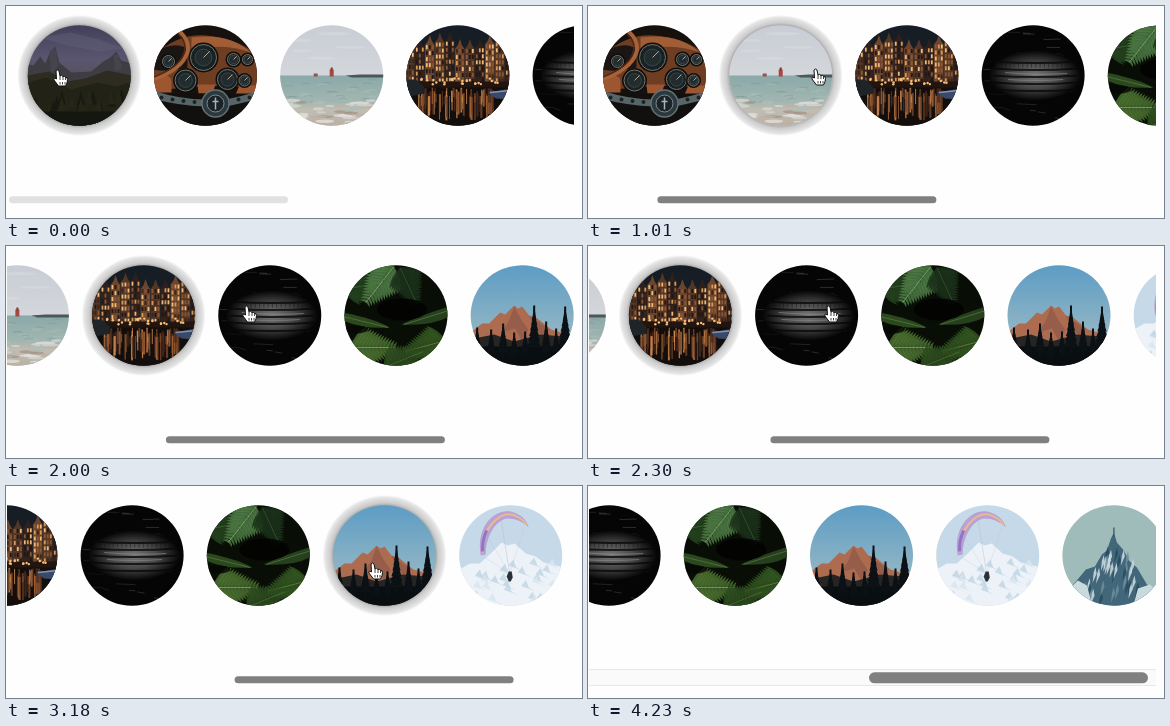
An HTML page for the animation above (4.46 s loop, 576 px wide and 212 px high).

```html
<!DOCTYPE html>
<html lang="en">
<head>
<meta charset="utf-8">
<title>Scrolling stories</title>
<style>
html, body { margin: 0; width: 100%; height: 100%; overflow: hidden; background: #fefefe; }
svg { display: block; width: 576px; height: 212px; }
</style>
</head>
<body>
<svg id="stage" viewBox="0 0 576 212"></svg>
<script>
const LOOP = 4460, GAP = 126.2, FIRST = 73.3, MID = 69.5;

let seed = 7;
const rnd = (a = 0, b = 1) => {
  seed = (seed * 16807) % 2147483647;
  return a + (b - a) * seed / 2147483647;
};
const pick = list => list[Math.floor(rnd(0, list.length))];
const repeat = (n, f) => Array.from({ length: n }, (_, i) => f(i)).join('');
const rect = (x, y, w, h, fill, o = 1) =>
  `<rect x="${x}" y="${y}" width="${w}" height="${h}" fill="${fill}" opacity="${o}"/>`;
const disc = (x, y, r, fill, stroke = 'none', w = 0) =>
  `<circle cx="${x}" cy="${y}" r="${r}" fill="${fill}" stroke="${stroke}" stroke-width="${w}"/>`;
const blob = (x, y, rx, ry, fill, o = 1) =>
  `<ellipse cx="${x}" cy="${y}" rx="${rx}" ry="${ry}" fill="${fill}" opacity="${o}"/>`;
const shape = (d, fill, o = 1) => `<path d="${d}" fill="${fill}" opacity="${o}"/>`;
const line = (d, stroke, w = 1, o = 1) =>
  `<path d="${d}" fill="none" stroke="${stroke}" stroke-width="${w}" opacity="${o}"/>`;
const back = fill => rect(-53, -52, 106, 104, fill);
const grad = (id, ...stops) => `<linearGradient id="${id}" x2="0" y2="1">` +
  stops.map(([at, c]) => `<stop offset="${at}" stop-color="${c}"/>`).join('') + '</linearGradient>';

function dusk() {
  return back('url(#dusk)') +
    shape('M-40-38L-8-43L20-36L45-27L20-24L-12-30Z', '#625f7a', .45) +
    shape('M-53-12L-46-10L-39-19L-34-12L-29-24L-24-29L-20-13L-8-3L12-4L24-14L31-18L37-24L42-15L53-12V30H-53Z', '#3e3d43') +
    shape('M-30-25L-24-27L-21-10L-28-2ZM34-20L38-22L43-8L36-4Z', '#4b4850', .7) +
    shape('M-53 0L-30-4L-12 6L6 3L28-5L53 0V52H-53Z', '#2e2b20') +
    shape('M-53 8L-34 2L-8 14L18 7L38 11L53 6V52H-53Z', '#222217') +
    repeat(34, () => {
      const x = rnd(-52, 52), y = rnd(12, 34);
      return shape(`M${x} ${y}l4 14h-8z`, pick(['#171a11', '#262516']));
    }) + rect(-53, 36, 106, 18, '#14170f');
}

function gauge(x, y, r) {
  return disc(x, y, r + 1, '#0d0f0f') + disc(x, y, r - 1, '#182123', '#77736a', 1) +
    disc(x, y, r * .6, '#222c2e', '#465153', .7) + line(`M${x} ${y}l${r * .45} ${-r * .45}`, '#b5a78c', 1);
}

function dashboard() {
  return back('#17110e') +
    shape('M-53-18Q-30-42 0-40T53-20V14Q10 6-53 16Z', '#6f3d22') +
    shape('M-14-38Q24-43 45-23Q24-32-14-27Z', '#a05d36') +
    shape('M-53-22Q-30-36-18-26V-8Q-36-3-53-6Z', '#1b1614') +
    shape('M-53 3Q-35-4-34 6V17H-53ZM-8 9H10L7 18H-7ZM34 10H53V19H30Z', '#9c5731') +
    gauge(-2, -18, 14) + gauge(-20, 5, 11.5) + gauge(22, 4, 11) +
    gauge(-37, -14, 7) + gauge(28, -16, 7) + gauge(42, -16, 6) + gauge(39, 5, 6.5) +
    line('M-32-48C-8-34-13-10-53 4', '#a86237', 4) + line('M-33-46C-12-33-17-11-53 2', '#4c281b', 1.5) +
    shape('M-53 18H53V52H-53Z', '#12100f') +
    shape('M-53 15Q-25 24 0 24H20Q38 21 53 15V23Q32 29 18 31H0Q-28 30-53 23Z', '#576569') +
    repeat(9, i => disc(-44 + i * 11, 22 + Math.sin(i / 8 * Math.PI) * 5, 2, '#1c2325')) +
    disc(10, 28, 13.5, '#2a393e', '#647277', 1.5) + disc(10, 28, 8.5, '#1a2326', '#7e8b8e', 1) +
    line('M10 22V34M7 26H13', '#aab3b3', 1.5) + line('M-40 38Q-28 48-18 47', '#4c352a', 2);
}

function sea() {
  return back('url(#haze)') +
    repeat(6, () => blob(rnd(-30, 35), rnd(-42, -14), rnd(8, 18), 1.5, '#d8dce0', .6)) +
    rect(-53, 0, 106, 53, 'url(#sea)') +
    shape('M14 0L28-1L53-1V2H20Z', '#4d5759') +
    rect(-2, -6, 4, 7, '#a9473e') + rect(-1, -8, 2, 3, '#7e3634') + rect(-18, -2, 4, 3, '#94534a') +
    repeat(30, () => line(`M${rnd(-50, 40)} ${rnd(4, 27)}q4-2 9 0`, pick(['#acc0bb', '#7f9a98']), 1, .6)) +
    repeat(46, () => blob(rnd(-46, 46), rnd(25, 49), rnd(4, 11), rnd(1, 2), pick(['#d8d6d1', '#c0b3a5', '#a4988a', '#b2bdb7', '#e2e0dc']), .8));
}

function canal() {
  const lights = ['#d99856', '#f0bb78', '#211714', '#8b5632', '#38251d'];
  const houses = repeat(11, i => {
    const x = -53 + i * 10, y = -37 + rnd(-5, 5);
    return shape(`M${x} 14V${y + 7}L${x + 3} ${y + 3}L${x + 5} ${y - 3}L${x + 7} ${y + 3}L${x + 9.6} ${y + 7}V14Z`,
      ['#533626', '#2e201c', '#6b452d'][i % 3]) +
      repeat(21, k => rect(x + 1 + k % 3 * 3, y + 7 + Math.floor(k / 3) * 6, 1.8, 4, pick(lights)));
  });
  return back('#171d24') + houses + rect(-53, 6, 106, 8, '#22150f') +
    repeat(26, () => disc(rnd(-48, 48), rnd(3, 9), 1.2, '#f6c07c')) +
    rect(-53, 12, 106, 42, '#130e0c') +
    repeat(75, () => rect(rnd(-40, 36), rnd(12, 22), rnd(.8, 2.4), rnd(8, 26), pick(['#d98f51', '#784729', '#4c2c1e', '#ad6839']), .8)) +
    shape('M-53 4L-42 4L-34 11V18L-53 22Z', '#1f2428') +
    shape('M30 17L53 13V24L38 23Z', '#39496a') + line('M32 17L53 15', '#8492b2', 1.5);
}

function ribs() {
  return back('#050505') +
    repeat(34, () => line(`M${rnd(-50, 30)} ${rnd(-46, 46)}l${rnd(4, 20)} ${rnd(-1, 2)}`, '#777', .6, rnd(.15, .6))) +
    blob(2, 0, 46, 25, 'url(#steel)') +
    repeat(5, i => line(`M-40 ${-14 + i * 7}Q2 ${-11 + i * 7} 45 ${-14 + i * 7}`, '#080808', 2, .8)) +
    repeat(18, i => line(`M${-36 + i * 4.3}-14v6`, '#151515', .8, .6)) +
    line('M-28-3Q4 0 34-2M-25 4Q4 6 30 4', '#8c8c8c', 1.2, .6);
}

// Narrow leaflets, shorter towards the tip.
function frond(x, y, len, turn, c, vein) {
  const n = 13;
  return `<g transform="translate(${x} ${y}) rotate(${turn})">` +
    repeat(n, i => {
      const p = i / n, l = len * (.46 - .36 * p), a = p * len;
      return [-1, 1].map(s =>
        shape(`M${a} 0Q${a + l * .25} ${s * l * .7} ${a + l * .8} ${s * l}Q${a + l * .6} ${s * l * .4} ${a + 3} 0Z`, c, .85)).join('');
    }) + line(`M0 0H${len}`, vein, .8) + '</g>';
}

function leaves() {
  return back('#080d06') +
    frond(-53, -26, 40, -10, '#24421e', '#42663a') +
    frond(-2, -49, 46, 128, '#4d7a43', '#83a876') + frond(4, -48, 40, 65, '#1c321a', '#375230') +
    shape('M53-9Q22 1 5 9Q36 11 53 1Z', '#263f1c') + line('M53-5L8 9', '#4a6b38') +
    shape('M-53-3Q-22 3-6 12Q-32 14-53 5Z', '#2b481e') + line('M-53 1L-8 12', '#4c6d38') +
    frond(-46, 32, 46, 0, '#4b7030', '#8aa75a') + frond(50, 25, 42, 165, '#335622', '#63833f') +
    frond(-12, 52, 42, -22, '#2d4d1f', '#4a6b31') +
    blob(6, -6, 25, 11, '#030402', .9) + blob(-40, 14, 12, 4, '#050704', .8);
}

function tree(x, y, w, h) {
  return repeat(6, i => {
    const half = w * (.3 + i * .14);
    return shape(`M${x} ${y + i * h / 9}l${half} ${h * .3}h${-2 * half}z`, '#0b1114');
  }) + rect(x - 1, y, 2, h, '#0b1114');
}

function ridge() {
  return back('url(#blue)') +
    shape('M-53 18L-40 8L-33 8L-22-3L-17-1L-8-10L-4-7L0-9L7 0L14 2L29 14L53 21V40H-53Z', '#ad6b50') +
    shape('M-8-9L-13 5L-21 17L-7 13L0 26L6 14L-1 4ZM7 0L12 13L20 20L27 14Z', '#7e5044', .5) +
    shape('M-53 24L-28 19L-8 26L18 19L53 22V52H-53Z', '#262523') +
    rect(-53, 31, 106, 22, '#090e10') +
    tree(12, -10, 7, 48) + tree(24, 6, 6, 35) + tree(43, -9, 8, 48) + tree(-19, 8, 6, 34) +
    tree(-31, 14, 5, 27) + tree(-45, 12, 6, 30) + tree(-8, 17, 5, 25) + tree(34, 13, 5, 28) + tree(3, 16, 5, 25);
}

function glider() {
  return back('#c5d9e9') +
    shape('M-53 15L-41 8L-31 8L-20-2L-9-13L-3-10L4-12L15-2L25 1L33 7L53 12V52H-53Z', '#ecf2f7') +
    repeat(30, () => shape(`M${rnd(-48, 44)} ${rnd(8, 45)}l5-6l3 8l6 3z`, pick(['#c2d6e5', '#d9e6ef']), .8)) +
    line('M-27 1L-1 18L-24-20M-1 18L-10-38L-1 18L14-28', '#b8b9cb', .4, .6) +
    shape('M-30 0C-35-28-17-47 0-44Q15-40 18-28Q9-37-3-37C-15-36-25-19-25-1Z', '#b9a1d3') +
    line('M-28-3C-29-27-12-43 1-41Q12-38 16-30', '#e6ba94', 2) +
    line('M-28-4Q-29-14-24-25', '#8e75c6', 3) +
    shape('M-2 16h3l1 6l-2 4h-2l-2-5z', '#29313b');
}

function peak() {
  return back('#9fbcbb') +
    shape('M-53 42L-38 26L-28 14L-19 11L-12-1L-7-5L-3-17L0-23L3-13L10-5L15 5L23 12L33 29L53 43V52H-53Z', '#42677a') +
    line('M0-28V-18', '#395766', 1.3) +
    repeat(44, () => {
      const y = rnd(-4, 46), x = rnd(-1, 1) * (y + 16) * .72;
      return shape(`M${x} ${y}l2-6l1 7l-4 9z`, pick(['#d0dde1', '#254b5f', '#6f8f9c']), .85);
    }) +
    shape('M-53 41L-36 25L-27 30L-21 52H-53ZM24 33L36 29L53 44V52H19Z', '#c9dadd');
}

const scenes = [dusk, dashboard, sea, canal, ribs, leaves, ridge, glider, peak];
const stage = document.getElementById('stage');
stage.innerHTML = `<defs>
  ${grad('dusk', [0, '#413f57'], [.35, '#5a5670'], [.6, '#564c51'])}
  ${grad('haze', [0, '#c8cdd5'], [.5, '#d3d6da'])}
  ${grad('sea', [0, '#8aa9a8'], [.5, '#a2b6b1'], [.65, '#c2bdb3'], [1, '#b9ada0'])}
  ${grad('blue', [0, '#5b9cc4'], [.7, '#94b6c4'])}
  <radialGradient id="steel"><stop offset="0" stop-color="#757575"/><stop offset=".5" stop-color="#484848"/>
    <stop offset="1" stop-color="#050505"/></radialGradient>
  <radialGradient id="glow"><stop offset=".8" stop-opacity=".42"/><stop offset=".87" stop-opacity=".2"/>
    <stop offset=".96" stop-opacity=".1"/><stop offset="1" stop-opacity="0"/></radialGradient>
  <clipPath id="round"><ellipse rx="51.5" ry="50.2"/></clipPath>
  <clipPath id="view"><rect x="1" width="567" height="212"/></clipPath></defs>
  <rect width="576" height="212" fill="#fefefe"/>
  <g clip-path="url(#view)"><g id="list">${scenes.map((draw, i) =>
    `<g transform="translate(${FIRST + GAP * i} ${MID})"><ellipse class="glow" rx="62" ry="60.5" fill="url(#glow)"/>
    <g clip-path="url(#round)">${draw()}</g></g>`).join('')}</g>
  <g id="track"><rect y="183" width="576" height="17" fill="#fafafa"/>
    <path d="M0 183.5H576M0 199.5H576" stroke="#e7e7e7"/></g></g>
  <rect id="thumb" width="279" fill="#808080"/>
  <g id="hand" stroke="#111" stroke-linejoin="round">
    <path d="M-4-7Q-2.500-9-1-7L0-2Q1.500-3.500 3-1.500Q4.500-2.500 5.500-.5Q7.500-1 7.500 1.500Q7.500 5 5.500 8H-1.500L-6 2Q-7-1-3.500 1Z" fill="#fff"/>
    <path d="M0-2V2M3-1.500V2M5.500-.5V2M0 4V6.500M2.500 4V6.500M5 4V6.500" stroke-width=".8"/></g>
  <path id="arrow" d="M0 0V13L3 10L5.500 15L8 14L5.500 9H9.500Z" fill="#111" stroke="#fff"/>`;

const el = id => document.getElementById(id);
const list = el('list'), track = el('track'), thumb = el('thumb'), hand = el('hand'), arrow = el('arrow');
const glows = [...stage.querySelectorAll('.glow')];
const clamp = v => Math.max(0, Math.min(1, v));

// Each key is [time, value, ...].
function along(keys, t, k = 1) {
  const i = keys.findIndex(key => key[0] > t);
  if (i < 0) return keys[keys.length - 1][k];
  if (!i) return keys[0][k];
  const a = keys[i - 1], b = keys[i];
  return a[k] + (b[k] - a[k]) * (t - a[0]) / (b[0] - a[0]);
}

const scroll = [[425, 0], [600, 28], [1010, 133], [1410, 223], [2000, 314], [2600, 405], [2910, 452], [3310, 452], [3700, 540], [3880, 557]];
const pointer = [[480, 54, 72], [900, 229, 71], [1010, 230, 71], [1410, 233, 73], [2000, 243, 68], [2600, 243, 68],
  [3120, 369, 85], [3310, 369, 85], [3760, 430, 184]];
// Item, hover start, hover end.
const hovers = [[0, -400, 560], [1, 560, 800], [2, 800, 1190], [3, 1190, 2720], [6, 2920, 3480]];
// Start, end and number of even ticks.
const beats = [[0, 240, 4], [240, 480, 1], [480, 1010, 9], [1010, 1590, 10], [1590, 2120, 9], [2120, 2660, 9],
  [2660, 3180, 9], [3180, 3360, 1], [3360, 3940, 10], [3940, 4230, 4], [4230, LOOP, 1]];

function tick(t) {
  const [a, b, n] = beats.find(beat => t < beat[1]) || beats[beats.length - 1];
  const step = (b - a) / n;
  return a + Math.min(n - 1, Math.floor((t - a + 8) / step)) * step;
}

function draw(time) {
  const t = tick(time), s = along(scroll, t);
  const x = along(pointer, t, 1), y = along(pointer, t, 2);
  list.setAttribute('transform', `translate(${-s} 0)`);
  glows.forEach((glow, i) => {
    const hover = hovers.find(h => h[0] === i);
    glow.setAttribute('opacity', hover ? Math.min(clamp((t - hover[1]) / 180), 1 - clamp((t - hover[2]) / 180)) : 0);
  });
  const wide = clamp((t - 3700) / 180), h = 7 + 4 * wide;
  track.setAttribute('opacity', wide);
  thumb.setAttribute('x', 3 + s / 2.0036);
  thumb.setAttribute('y', 197.3 - h);
  thumb.setAttribute('height', h);
  thumb.setAttribute('rx', h / 2);
  thumb.setAttribute('opacity', clamp(.23 + t / 310));
  hand.setAttribute('transform', `translate(${x} ${y})`);
  hand.setAttribute('opacity', t < 3600 ? 1 : 0);
  arrow.setAttribute('transform', `translate(${x} ${y + 6})`);
  arrow.setAttribute('opacity', t >= 3600 && t < 4200 ? 1 : 0);
}

const start = performance.now();
function frame() {
  draw((performance.now() - start) % LOOP);
  requestAnimationFrame(frame);
}
draw(0);
requestAnimationFrame(frame);
</script>
</body>
</html>
```
